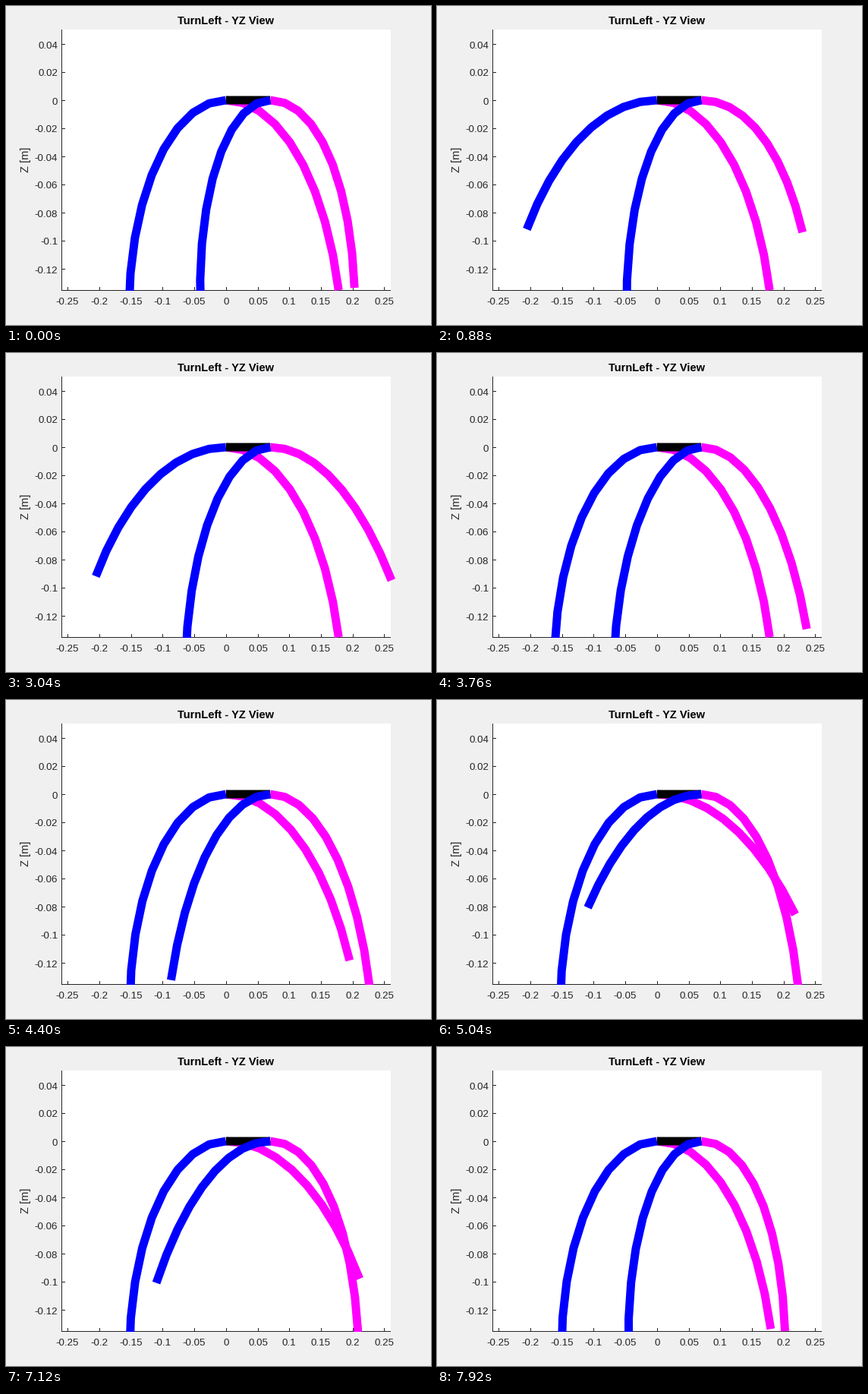
A matplotlib script that plays this animation: 560x420 px, repeating every 8 s.

```python
import numpy as np
import matplotlib
import matplotlib.pyplot as plt
from matplotlib.animation import FuncAnimation
from matplotlib.patches import Rectangle

W, H, DPI = 560, 420, 100
PT = 72 / DPI                      # points per pixel
FRAMES, STEP_MS = 100, 80
HALF = FRAMES // 2

LEFT, RIGHT, TOP, BOTTOM = 73, 507, 31, 374
X0, X_SCALE = 289.8, 834.6         # pixel of y = 0, pixels per metre
Z0, Z_SCALE = 124.0, 1850.3
BODY = 0.07
LEG = 0.24
BAR = 11 * PT
INK = "#262626"
BLUE, MAGENTA = "#0000ff", "#ff00ff"

matplotlib.rcParams["font.family"] = "Liberation Sans"


def px(y):
    return X0 + X_SCALE * np.asarray(y)


def pz(z):
    return Z0 - Z_SCALE * np.asarray(z)


def stroke(x, y, color, width, layer):
    line, = ax.plot(x, y, color=color, lw=width, zorder=layer, snap=False,
                    solid_capstyle="butt", solid_joinstyle="round")
    return line


class Leg:
    """Constant-curvature leg that swings for half the loop, then stands."""

    def __init__(self, base, side, yaw_cos, color, layer, start,
                 rest, lift, sweep=(0, 0), whip=0):
        self.base, self.side, self.start = base, side, start
        self.cos, self.sin = yaw_cos, np.sqrt(1 - yaw_cos ** 2)
        self.rest, self.lift = rest, lift
        self.sweep, self.whip = sweep, whip
        self.line = stroke([], [], color, BAR, layer)
        self.line.set_clip_path(clip)

    def bends(self, frame):
        """Return the downward and sideways bend in radians."""
        step = (frame - self.start) % FRAMES
        back, front = self.sweep
        if step >= HALF:
            t = (step - HALF) / (HALF - 1)
            return self.rest, front + (back - front) * t
        t = (step + 1) / (HALF + 1)
        down = self.rest - self.lift * np.sin(np.pi * t) ** 1.3
        across = back + (front - back) * (1 - np.cos(np.pi * t)) / 2
        return down, across - self.whip * np.sin(2 * np.pi * t)

    def pose(self, frame):
        u, v = self.bends(frame)
        bend = np.hypot(u, v)
        a = np.linspace(0, bend, 10)
        along = LEG * np.sin(a) / bend
        drop = LEG * (1 - np.cos(a)) / bend
        reach = self.cos * along + self.sin * drop * v / bend
        self.line.set_data(px(self.base + self.side * reach), pz(-drop * u / bend))


fig = plt.figure(figsize=(W / DPI, H / DPI), dpi=DPI, facecolor="#f0f0f0")
ax = fig.add_axes([0, 0, 1, 1])
ax.set_xlim(0, W)
ax.set_ylim(H, 0)
ax.axis("off")

ax.add_patch(Rectangle((LEFT, TOP), RIGHT - LEFT, BOTTOM - TOP,
                       fc="white", lw=0, zorder=0))
clip = Rectangle((0, 0), W, BOTTOM + 0.5, transform=ax.transData)


def rule(x, y):
    stroke(x, y, INK, PT, 1)


def label(x, y, text, size, **kw):
    style = dict(color=INK, ha="center", va="baseline")
    style.update(kw)
    ax.text(x, y, text, fontsize=size * PT, **style)


rule([LEFT, RIGHT], [BOTTOM + 0.5] * 2)
rule([LEFT + 0.5] * 2, [TOP, BOTTOM + 1])
for k in range(-5, 6):
    x = round(float(px(k * 0.05))) + 0.5
    rule([x, x], [BOTTOM - 4, BOTTOM])
    label(x - 0.5, 393, f"{k * 0.05:.2g}", 13.33)
for k in range(-6, 3):
    y = round(float(pz(k * 0.02))) + 0.5
    rule([LEFT, LEFT + 5], [y, y])
    label(68, y + 5, f"{k * 0.02:.2g}", 13.33, ha="right")
label(290, 24, "TurnLeft - YZ View", 14.67, color="black", weight="bold")
label(30, 202, "Z [m]", 14.67, rotation=90, rotation_mode="anchor")

stroke(px([0, BODY]), pz([0, 0]), "black", BAR, 4)

legs = [
    Leg(0, 1, 1, MAGENTA, 3, HALF, rest=1.3, lift=0.79),
    Leg(BODY, 1, 0.86, MAGENTA, 3, 0, rest=1.315, lift=0.795,
        sweep=(-0.32, 0.14), whip=0.08),
    Leg(0, -1, 1, BLUE, 5, 0, rest=1.565, lift=1.235,
        sweep=(-0.3, 0.3), whip=0.25),
    Leg(BODY, -1, 0.82, BLUE, 5, HALF, rest=1.61, lift=1.3,
        sweep=(0.37, -0.21), whip=0.3),
]


def draw(frame):
    for leg in legs:
        leg.pose(frame)
    return [leg.line for leg in legs]


anim = FuncAnimation(fig, draw, frames=FRAMES, interval=STEP_MS, repeat=True)
plt.show()
```
